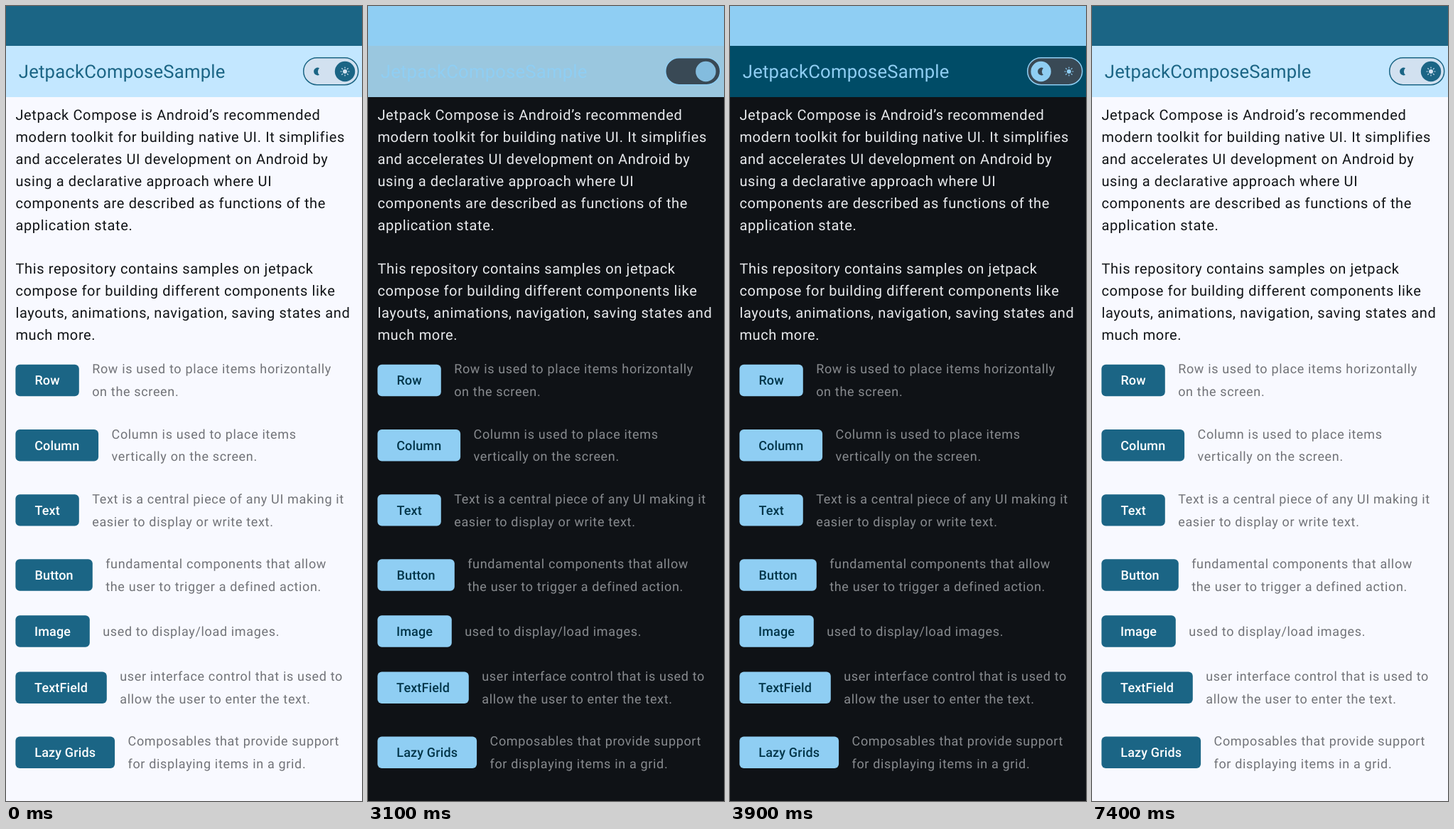
These frames come from a looping animation (501x1117 px, 7500 ms). An HTML page:

```html
<!DOCTYPE html>
<html lang="en">
<head>
<meta charset="utf-8">
<title>JetpackComposeSample</title>
<style>
  html, body { margin: 0; width: 100%; height: 100%; overflow: hidden; }
  svg {
    display: block; width: 501px; height: 1117px; background: var(--bg);
    font-family: Roboto, sans-serif; text-rendering: geometricPrecision;
    --primary: #1b6585; --on-primary: #fff; --bg: #f8f9ff;
    --text: #111417; --hint: #717378; --track: #d2e1f0;
  }
  svg.dark {
    --primary: #8fcef3; --on-primary: #003549; --bg: #0f1216;
    --text: #e8eaed; --hint: #888b8f; --track: #394955;
  }
  .primary { fill: var(--primary); }
  .track { fill: var(--track); }
  .title { font-size: 25.7px; letter-spacing: .19px; }
  .body { font-size: 20.05px; letter-spacing: .63px; fill: var(--text); }
  .hint { font-size: 18px; letter-spacing: .66px; fill: var(--hint); }
  .label { font-size: 18px; font-weight: 500; letter-spacing: .13px; text-anchor: middle; fill: var(--on-primary); }
</style>
</head>
<body>
<svg id="stage" viewBox="0 0 501 1117">
  <rect class="primary" width="501" height="56"/>
  <rect id="header" y="56" width="501" height="72"/>
  <text class="title primary" x="17.8" y="101">JetpackComposeSample</text>
  <rect class="track" x="418.7" y="72.7" width="77" height="38" rx="19" stroke="var(--primary)" stroke-width="1.5"/>
  <g id="knob">
    <circle class="primary" cy="92" r="14.2"/>
    <circle id="press" class="track" cy="92" r="14.2"/>
  </g>
  <g id="icons">
    <path id="moon" d="M441 87.2A5.4 5.4 0 1 0 441 96.8A6.4 6.4 0 0 1 441 87.2Z"/>
    <g id="sun">
      <circle cx="477" cy="92" r="3" stroke="none"/>
      <path id="rays" stroke-width="1.2" stroke-linecap="round"/>
    </g>
  </g>
  <g id="content"></g>
</svg>
<script>
const $ = id => document.getElementById(id);
const LOOP = 7500, STEP = 100, TO_DARK = 3100, TO_LIGHT = 6800;
const HEADER = { light: [195, 231, 255], dark: [0, 76, 103] };
const KNOB_X = { light: 477, dark: 437.6 };
const LEFT = 13.4;

const paragraphs = [
  'Jetpack Compose is Android’s recommended',
  'modern toolkit for building native UI. It simplifies',
  'and accelerates UI development on Android by',
  'using a declarative approach where UI',
  'components are described as functions of the',
  'application state.',
  '',
  'This repository contains samples on jetpack',
  'compose for building different components like',
  'layouts, animations, navigation, saving states and',
  'much more.'
];

// label, right edge of the button, vertical centre, description lines
const rows = [
  ['Row', 102.8, 526, 'Row is used to place items horizontally', 'on the screen.'],
  ['Column', 130.1, 617.3, 'Column is used to place items', 'vertically on the screen.'],
  ['Text', 102.8, 708.4, 'Text is a central piece of any UI making it', 'easier to display or write text.'],
  ['Button', 121.8, 799.5, 'fundamental components that allow', 'the user to trigger a defined action.'],
  ['Image', 117.8, 878.5, 'used to display/load images.'],
  ['TextField', 141.8, 957.7, 'user interface control that is used to', 'allow the user to enter the text.'],
  ['Lazy Grids', 153.1, 1048.8, 'Composables that provide support', 'for displaying items in a grid.']
];

const text = (cls, x, y, str) => `<text class="${cls}" x="${x}" y="${y}">${str}</text>`;

function drawRow([label, right, mid, ...lines]) {
  const first = lines.length > 1 ? mid - 9.7 : mid + 6.3;
  return `<rect class="primary" x="${LEFT}" y="${mid - 22.2}" width="${right - LEFT}" height="44.4" rx="6"/>`
    + text('label', (LEFT + right) / 2, mid + 6.4, label)
    + lines.map((line, i) => text('hint', right + 18.4, first + i * 31.8, line)).join('');
}

$('content').innerHTML =
  paragraphs.map((line, i) => text('body', LEFT, 160.4 + i * 30.85, line)).join('')
  + rows.map(drawRow).join('');

$('rays').setAttribute('d', Array.from({ length: 8 }, (_, i) => {
  const c = Math.cos(i * Math.PI / 4), s = Math.sin(i * Math.PI / 4);
  return `M${477 + 4.8 * c} ${92 + 4.8 * s}L${477 + 6 * c} ${92 + 6 * s}`;
}).join(''));

// Critically damped spring from 0 to 1
const spring = (ms, omega) => 1 - (1 + omega * ms / 1000) * Math.exp(-omega * ms / 1000);
const mix = (a, b, p) => a + (b - a) * p;

function render() {
  const t = Math.floor(performance.now() % LOOP / STEP) * STEP;
  const dark = t >= TO_DARK && t < TO_LIGHT;
  const [from, to] = dark ? ['light', 'dark'] : ['dark', 'light'];
  const elapsed = (t - (dark ? TO_DARK : TO_LIGHT) + LOOP) % LOOP + 16;
  const fade = spring(elapsed, 53), slide = spring(elapsed, 20);

  $('stage').classList.toggle('dark', dark);
  $('header').style.fill = `rgb(${HEADER[from].map((v, i) => mix(v, HEADER[to][i], fade))})`;
  $('knob').setAttribute('transform', `translate(${mix(KNOB_X[from], KNOB_X[to], slide)})`);
  $('press').style.opacity = dark ? 0.13 * Math.min(1, Math.max(0, (800 - elapsed) / 300)) : 0;
  $('icons').style.opacity = slide;
  $('moon').style.fill = dark ? 'var(--track)' : 'var(--primary)';
  $('sun').style.fill = $('sun').style.stroke = dark ? 'var(--primary)' : 'var(--track)';
  requestAnimationFrame(render);
}
render();
</script>
</body>
</html>
```
